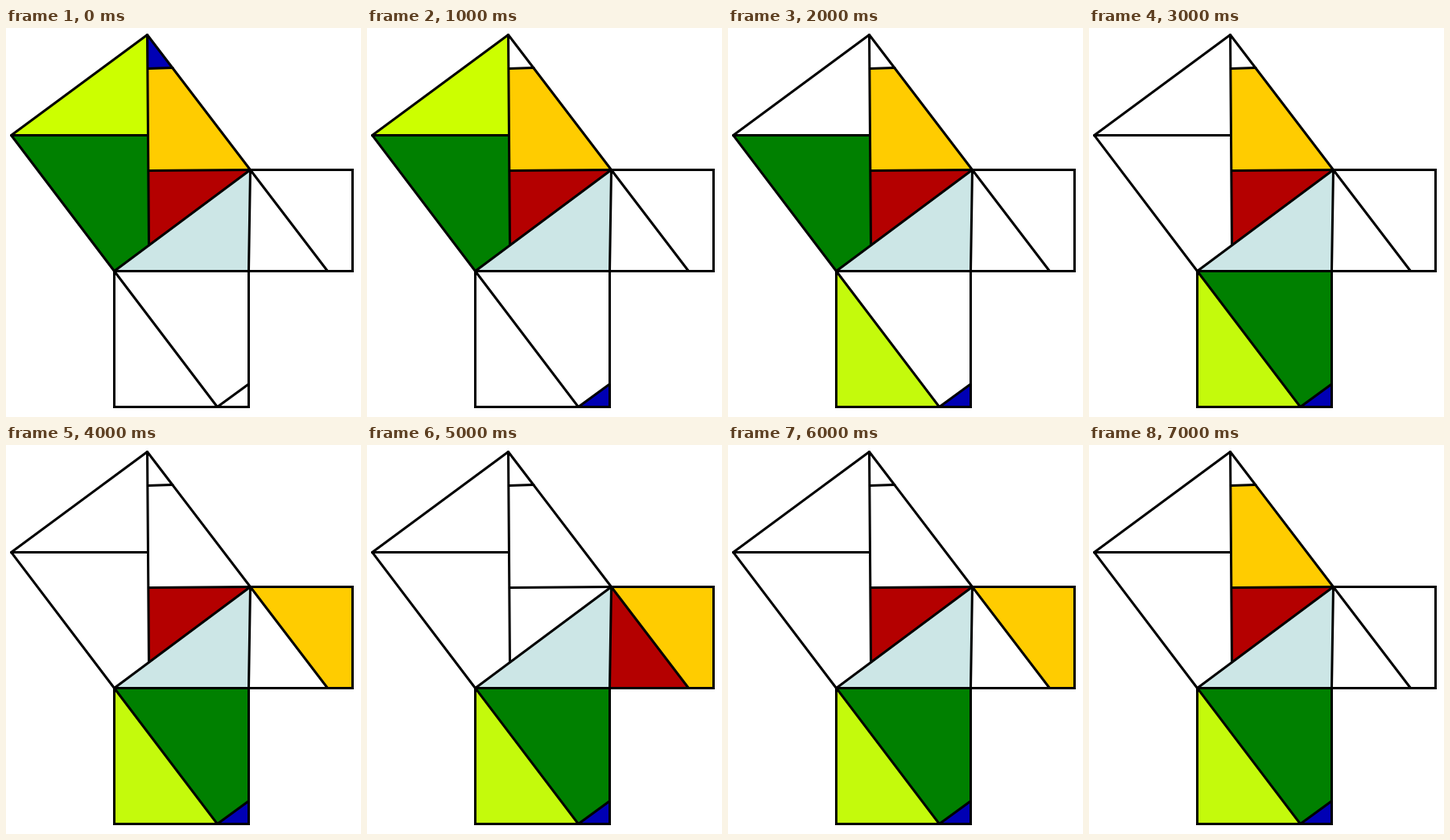
Write an HTML page that moves like this. It is 441 px wide and 484 px high and loops after 8 s.

```html
<!DOCTYPE html>
<html lang="en">
<head>
<meta charset="utf-8">
<title>Square dissection</title>
<style>
html, body { margin: 0; width: 100%; height: 100%; overflow: hidden; background: #fff; }
svg { display: block; width: 441px; height: 484px; }
</style>
</head>
<body>
<svg viewBox="0 0 441 484">
  <g id="pieces"></g>
  <g fill="none" stroke="#000" stroke-width="3" stroke-linecap="round" stroke-linejoin="round">
    <path d="M175.5 8.5 L6.5 133.5 L134.5 302.5 L303.5 176.5 Z"/>
    <path d="M175.5 8.5 L177.5 270 M6.5 133.5 H176.5 M176.5 50.5 L207 49.5 M177.5 177.5 L303.5 176.5"/>
    <path d="M303.5 176.5 L399.5 302.5 M303.5 176.5 L301.5 302.5"/>
    <path d="M134.5 302.5 L262.5 471.5 L301.5 443"/>
    <path d="M303.5 176.5 H430.5 V302.5 H134.5 V471.5 H301.5 V302.5" stroke-linejoin="miter"/>
  </g>
</svg>
<script>
const STEP = 1000, LOOP = 8000;

// Each piece sits at its away place from step "out" until step "back".
const pieces = [
  { home: "176,8 176,50 207,49", away: "263,471 302,443 302,471", fill: "#0000b4", out: 1, back: 8 },
  { home: "176,8 7,133 177,133", away: "135,302 135,471 263,471", fill: "#ccff00", awayFill: "#c4fa0c", out: 2, back: 8 },
  { home: "7,133 177,133 178,270 135,302", away: "135,302 302,302 302,443 263,471", fill: "#008000", out: 3, back: 8 },
  { home: "176,50 207,49 304,177 177,177", away: "304,177 430,177 430,302 399,302", fill: "#ffcc00", out: 4, back: 7 },
  { home: "177,177 304,177 178,270", away: "304,177 399,302 302,302", fill: "#b40000", out: 5, back: 6 },
  { home: "304,177 302,302 135,302", fill: "#cce6e6", out: 8, back: 8 }
];

const layer = document.getElementById("pieces");
for (const p of pieces) {
  p.el = document.createElementNS("http://www.w3.org/2000/svg", "polygon");
  layer.appendChild(p.el);
}

function draw(ms) {
  const step = Math.floor((ms % LOOP) / STEP);
  for (const p of pieces) {
    const moved = step >= p.out && step < p.back;
    p.el.setAttribute("points", moved ? p.away : p.home);
    p.el.setAttribute("fill", moved && p.awayFill || p.fill);
  }
}

const start = performance.now();
function tick() {
  draw(performance.now() - start);
  requestAnimationFrame(tick);
}
tick();
</script>
</body>
</html>
```
